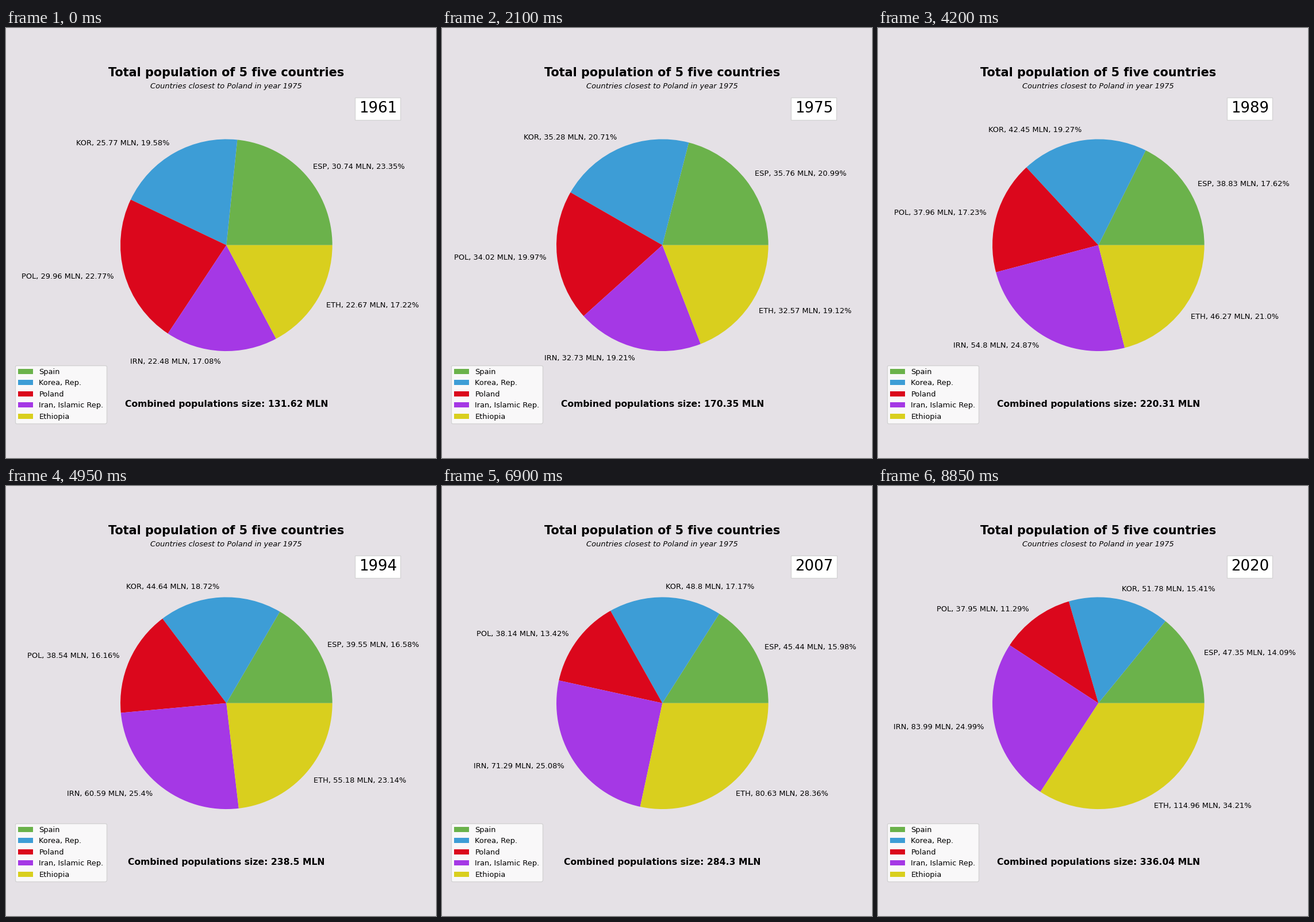
A matplotlib script that plays this animation: 748x748 px, repeating every 9 s.

```python
import numpy as np
import matplotlib.pyplot as plt
from matplotlib.animation import FuncAnimation

plt.rcParams["font.family"] = "DejaVu Sans"

BACKGROUND = "#e5e1e6"
YEARS = np.arange(1961, 2021)

# Key years and the populations (millions) that each curve passes through.
KEYS = np.array([1961, 1968, 1975, 1984, 1989, 1994, 2001, 2008, 2012, 2020])
COUNTRIES = [
    ("ESP", "Spain", "#6bb24b",
     [30.739, 33.113, 35.758, 38.330, 38.828, 39.549, 40.850, 45.954, 46.773, 47.352]),
    ("KOR", "Korea, Rep.", "#3d9dd6",
     [25.766, 30.838, 35.281, 40.406, 42.449, 44.642, 47.370, 49.055, 50.200, 51.781]),
    ("POL", "Poland", "#db071c",
     [29.964, 32.295, 34.015, 36.904, 37.962, 38.543, 38.248, 38.126, 38.063, 37.951]),
    ("IRN", "Iran, Islamic Rep.", "#a538e5",
     [22.480, 27.030, 32.731, 45.474, 54.800, 60.588, 66.449, 72.121, 75.540, 83.993]),
    ("ETH", "Ethiopia", "#d9cf1e",
     [22.671, 26.944, 32.567, 39.374, 46.272, 55.181, 68.159, 82.916, 92.727, 114.964]),
]
CODES, NAMES, COLORS, POINTS = zip(*COUNTRIES)


def smooth_curve(x, y, at):
    """Cubic Hermite curve through (x, y)."""
    y = np.asarray(y)
    slope = np.gradient(y, x)
    k = np.clip(np.searchsorted(x, at, side="right") - 1, 0, len(x) - 2)
    h = x[k + 1] - x[k]
    t = (at - x[k]) / h
    s = 1 - t
    return (s * s * ((1 + 2 * t) * y[k] + t * h * slope[k])
            + t * t * ((3 - 2 * t) * y[k + 1] - s * h * slope[k + 1]))


POPULATION = np.array([smooth_curve(KEYS, p, YEARS) for p in POINTS]).T

fig, ax = plt.subplots(figsize=(8, 8), dpi=93.5, facecolor=BACKGROUND)


def short(value):
    return str(round(float(value), 2))


def centered(y, text, **style):
    ax.text(0, y, text, ha="center", va="center", **style)


def draw(i):
    ax.clear()
    values = POPULATION[i]
    total = values.sum()
    labels = [f"{code}, {short(v)} MLN, {short(v / total * 100)}%"
              for code, v in zip(CODES, values)]
    wedges, _ = ax.pie(values, labels=labels, colors=COLORS, radius=0.8)

    centered(1.3, "Total population of 5 five countries", fontsize=16, weight="bold")
    centered(1.2, "Countries closest to Poland in year 1975", fontsize=10, style="italic")
    centered(-1.2, f"Combined populations size: {short(total)} MLN",
             fontsize=12, weight="bold")
    ax.text(1, 1, str(YEARS[i]), fontsize=20,
            bbox=dict(facecolor="white", edgecolor="lightgray", pad=5))
    ax.legend(wedges, NAMES, loc="lower center", bbox_to_anchor=(0, -0.05))
    return []


anim = FuncAnimation(fig, draw, frames=len(YEARS), init_func=lambda: [],
                     interval=150, repeat=True, repeat_delay=0)
plt.show()
```
